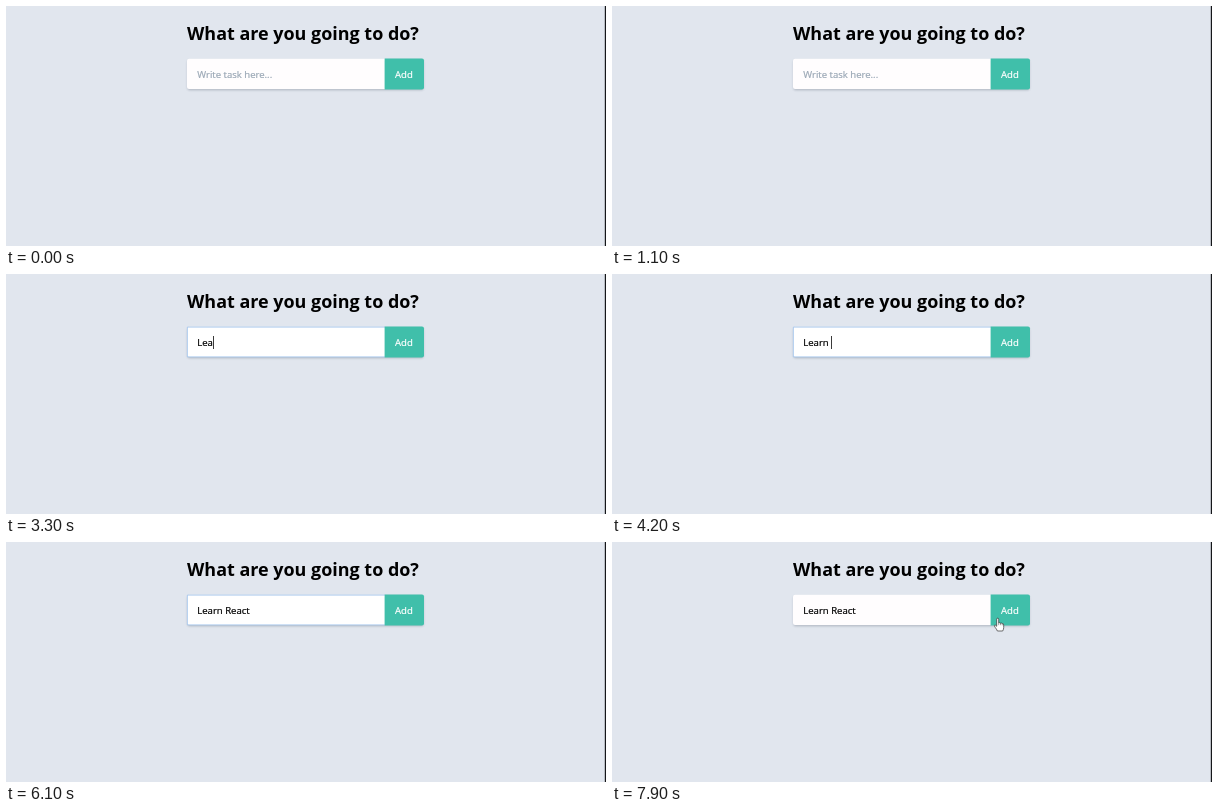
An HTML page that plays this animation: 600 px wide and 240 px high, repeating every 8 s.

```html
<!DOCTYPE html>
<html lang="en">
<head>
<meta charset="utf-8">
<title>Task input</title>
<style>
  html, body { margin: 0; width: 100%; height: 100%; overflow: hidden; background: #e1e6ee; }
  svg { display: block; width: 600px; height: 240px; }
  text { font-family: "Open Sans", "Noto Sans", sans-serif; font-size: 9.55px; white-space: pre; }
  #title { font-size: 17.95px; font-weight: 700; }
  .field { stroke-width: .22px; }
</style>
</head>
<body>
<svg viewBox="0 0 600 240">
  <defs>
    <filter id="soft" x="-5%" y="-20%" width="110%" height="150%">
      <feGaussianBlur stdDeviation="1"/>
    </filter>
  </defs>
  <rect width="600" height="240" fill="#e1e6ee"/>
  <rect x="598.8" width="1.2" height="240" fill="#15171a"/>
  <text id="title" x="181" y="33.8">What are you going to do?</text>

  <rect x="181.5" y="54" width="236" height="30.3" rx="2" fill="#788291" opacity=".45" filter="url(#soft)"/>
  <path id="box" d="M183 52.8H379V83.1H183Q181 83.1 181 81.1V54.8Q181 52.8 183 52.8Z"/>
  <path id="focus" d="M379 53.1H181.4V82.9H379" fill="none" stroke="#a6c7ed" stroke-width=".9"/>
  <path d="M378.6 52.6H416Q418 52.6 418 54.6V81.4Q418 83.4 416 83.4H378.6Z" fill="#40bfaa"/>
  <text class="field" x="389" y="71.9" fill="#fff" stroke="#fff">Add</text>

  <text class="field" id="hint" x="191.3" y="71.9" fill="#9aa7b5" stroke="#9aa7b5">Write task here...</text>
  <text class="field" id="task" x="191.3" y="71.9" fill="#000" stroke="#000"></text>
  <rect id="caret" y="62" width="1" height="13" fill="#3a3a3a"/>

  <path id="arrow" d="M0 0V11L2.6 8.6L4.4 12.6L6.2 11.8L4.4 7.9H8Z"
        fill="#fff" stroke="#222" stroke-width=".7"/>
  <g id="hand" fill="#fff" stroke="#333" stroke-width=".7" stroke-linejoin="round">
    <path d="M-1 1Q-1 0 0 0Q1 0 1 1V4.7Q1.5 4 2.8 5Q3.5 4.4 4.5 5.4Q6 5 6 6.8V9.4Q6 11 5 12.8H-.3Q-1.2 10.8-2.5 9.2Q-4 7.2-3 6.9Q-2.2 6.7-1 8.1Z"/>
    <path d="M1 4.7V7M2.8 5V7M4.5 5.4V7.2" fill="none" stroke-width=".45"/>
  </g>
</svg>
<script>
const LOOP = 8000, STEP = 100, BLINK = 530;
const CLICK = 1200, BLUR = 7900;
const TASK = "Learn React";
// one time per typed character
const KEYS = [2600, 2800, 3300, 3400, 3500, 4200, 4700, 4900, 5100, 5300, 5600];

const $ = id => document.getElementById(id);
const show = (el, on) => el.setAttribute("visibility", on ? "visible" : "hidden");
const mix = (a, b, p) => a + (b - a) * p;
const ease = p => p * p * (3 - 2 * p);

function movePointer(el, t, start, end, from, to) {
  const p = ease(Math.min(1, Math.max(0, (t - start) / (end - start))));
  el.setAttribute("transform", `translate(${mix(from[0], to[0], p)} ${mix(from[1], to[1], p)})`);
}

function draw(now) {
  const t = Math.floor(now % LOOP / STEP) * STEP;
  const typed = KEYS.filter(k => k <= t).length;
  const focused = t >= CLICK && t < BLUR;

  $("task").textContent = TASK.slice(0, typed);
  $("box").setAttribute("fill", focused ? "#fff" : "#fffdfe");
  show($("hint"), !typed);
  show($("focus"), focused);

  // typing restarts the blink
  const since = t - (typed ? KEYS[typed - 1] : CLICK);
  const lit = Math.floor((since + STEP / 2) / BLINK) % 2 === 0;
  const width = typed ? $("task").getComputedTextLength() : 0;
  $("caret").setAttribute("x", Math.round(191 + width));
  show($("caret"), focused && lit);

  // the pointer is hidden while it is over the field
  show($("arrow"), t >= 300 && t < 1000);
  movePointer($("arrow"), t, 200, 1100, [570, 203], [330, 72]);
  show($("hand"), t >= 7500);
  movePointer($("hand"), t, 7400, 7700, [379, 72], [385.7, 76.2]);
}

function frame() {
  draw(performance.now());
  requestAnimationFrame(frame);
}
frame();
</script>
</body>
</html>
```
